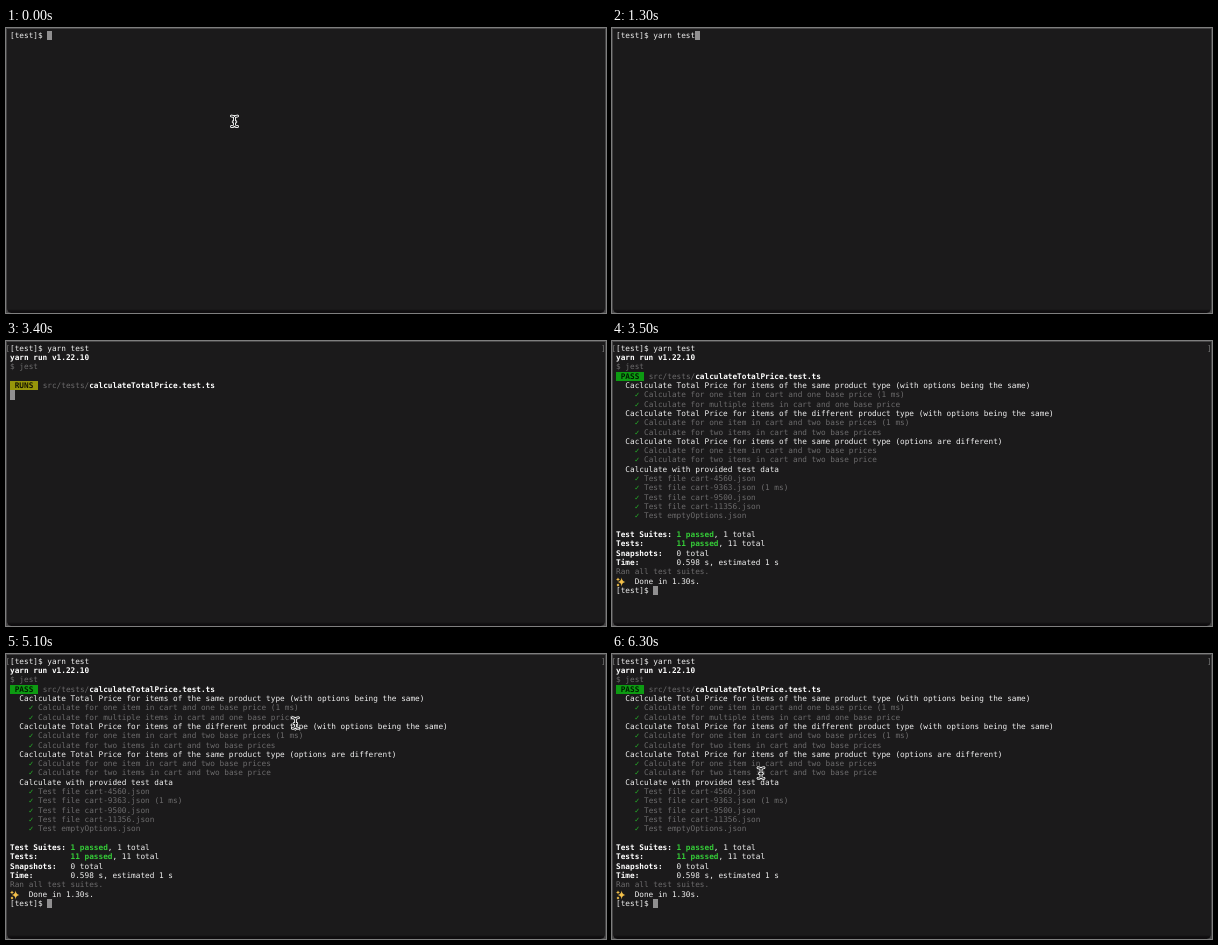
Animation, 600 px wide and 285 px high, one loop 6.4 s. Source, as an HTML page:

```html
<!DOCTYPE html>
<html lang="en">
<head>
<meta charset="utf-8">
<title>Test run in a terminal</title>
<style>
  html, body { margin: 0; width: 100%; height: 100%; overflow: hidden; background: #4a494a; }
  #win {
    position: absolute; inset: 0; box-sizing: border-box; overflow: hidden;
    background: linear-gradient(#1b1a1b 280px, #0f0d0f 282px);
    border: 1px solid #444344; border-bottom: 0; border-radius: 0 0 5px 5px;
  }
  pre, .mark {
    position: absolute; margin: 0; color: #f0f0f0;
    font: 7.74px/9.31px "DejaVu Sans Mono", monospace;
    text-rendering: geometricPrecision;
  }
  pre { left: 4px; top: 2.7px; }
  b { color: #fff; }
  i { font-style: normal; color: #6c6b6c; }
  u { text-decoration: none; color: #27b52a; }
  b u { color: #35cc38; }
  .runs, .pass { color: #161500; background: #98960a; }
  .pass { color: #001a00; background: #0d9b12; }
  .mark { top: 2.7px; color: #777; }
  #cursor { position: absolute; width: 4.8px; height: 9.4px; background: #908f90; }
  svg { position: absolute; overflow: visible; }
</style>
</head>
<body>
<div id="win"></div>
<pre id="text"></pre>
<span class="mark" style="left:-.4px">[</span>
<span class="mark" style="left:595px">]</span>
<div id="cursor"></div>
<svg id="spark" width="10" height="10" style="left:4px;top:235.5px" fill="#f3c04a">
  <path d="M5.6 .6Q6 4.6 9.4 5Q6 5.4 5.6 9.4Q5.2 5.4 1.8 5Q5.2 4.6 5.6 .6Z"/>
  <path d="M2 .4L2.6 1.8L4 2.4L2.6 3L2 4.4L1.4 3L0 2.4L1.4 1.8ZM2 6.6L3.4 8L2 9.4L.6 8Z"/>
</svg>
<svg id="pointer" width="1" height="1" style="left:0;top:0" fill="none" stroke-linecap="round">
  <path id="beam" d="M-3 -5.3Q-.4 -5.3 0 -3.8Q.4 -5.3 3 -5.3M-3 5.3Q-.4 5.3 0 3.8Q.4 5.3 3 5.3M0 -3.8V3.8M-1.4 .6H1.4" stroke="#eee" stroke-width="2.6"/>
  <use href="#beam" id="core"/>
  <path d="M-3 -5.3Q-.4 -5.3 0 -3.8Q.4 -5.3 3 -5.3M-3 5.3Q-.4 5.3 0 3.8Q.4 5.3 3 5.3M0 -3.8V3.8M-1.4 .6H1.4" stroke="#111" stroke-width="1"/>
</svg>
<script>
const LOOP = 6400, STEP = 100, COL = 4.66, ROW = 9.31;
const $ = id => document.getElementById(id);
const prompt = '[test]$ ', command = 'yarn test';
const keys = [200, 400, 500, 600, 800, 1000, 1100, 1200, 1300];
const path = [[4600, 229, 93], [4700, 231, 93], [5200, 304, 63], [5500, 153, 101], [5900, 149, 119]];

const badge = (name, kind) =>
  `<b class="${kind}"> ${name} </b> <i>src/tests/</i><b>calculateTotalPrice.test.ts</b>`;
const group = (title, ...tests) =>
  [`  ${title}`, ...tests.map(s => `    <u>✓</u> <i>${s}</i>`)].join('\n');
const total = (label, value) => `<b>${(label + ':').padEnd(13)}</b>${value}`;
const passed = n => `<b><u>${n} passed</u></b>, ${n} total`;

const head = '\n<b>yarn run v1.22.10</b>\n<i>$ jest</i>';
const running = head + '\n\n' + badge('RUNS', 'runs');
const price = 'Caclculate Total Price for items of the ';
const one = 'Calculate for one item in cart and ';
const two = 'Calculate for two items in cart and ';
const done = [
  head,
  badge('PASS', 'pass'),
  group(price + 'same product type (with options being the same)',
    one + 'one base price (1 ms)', 'Calculate for multiple items in cart and one base price'),
  group(price + 'different product type (with options being the same)',
    one + 'two base prices (1 ms)', two + 'two base prices'),
  group(price + 'same product type (options are different)',
    one + 'two base prices', two + 'two base price'),
  group('Calculate with provided test data',
    ...['cart-4560', 'cart-9363', 'cart-9500', 'cart-11356', 'emptyOptions'].map(
      s => `Test file ${s}.json`.replace('file empty', 'empty') + (s === 'cart-9363' ? ' (1 ms)' : ''))),
  '',
  total('Test Suites', passed(1)),
  total('Tests', passed(11)),
  total('Snapshots', '0 total'),
  total('Time', '0.598 s, estimated 1 s'),
  '<i>Ran all test suites.</i>',
  '    Done in 1.30s.',
  prompt
].join('\n');

// [start, output, cursor column, cursor row]
const stages = [
  [2000, '', 0, 1],
  [2200, head, 0, 3],
  [2900, running, 0, 5],
  [3500, done, 8, 26]
];

function pointerAt(t) {
  if (t < 200) return [228.5, 93.3];
  if (t < path[0][0]) return null;
  const k = path.findIndex(p => p[0] > t);
  if (k < 0) return path[path.length - 1].slice(1);
  const [a, b] = [path[k - 1], path[k]], f = (t - a[0]) / (b[0] - a[0]);
  return [1, 2].map(j => a[j] + (b[j] - a[j]) * f);
}

let shown = '';
function draw(now) {
  const t = Math.floor(now % LOOP / STEP) * STEP;
  const typed = keys.filter(k => k <= t).length;
  const [, output, col, row] = stages.filter(s => s[0] <= t).pop() || [0, '', prompt.length + typed, 0];
  const html = prompt + command.slice(0, typed) + output;
  if (html !== shown) $('text').innerHTML = shown = html;
  $('cursor').style.left = 4 + col * COL + 'px';
  $('cursor').style.top = 2.6 + row * ROW + 'px';
  document.querySelectorAll('.mark').forEach(m => m.hidden = t < 2000);
  $('spark').style.display = t < 3500 ? 'none' : '';
  const p = pointerAt(t);
  $('pointer').style.display = p ? '' : 'none';
  if (p) $('pointer').style.transform = `translate(${p[0]}px, ${p[1]}px)`;
  requestAnimationFrame(draw);
}
draw(performance.now());
</script>
</body>
</html>
```
